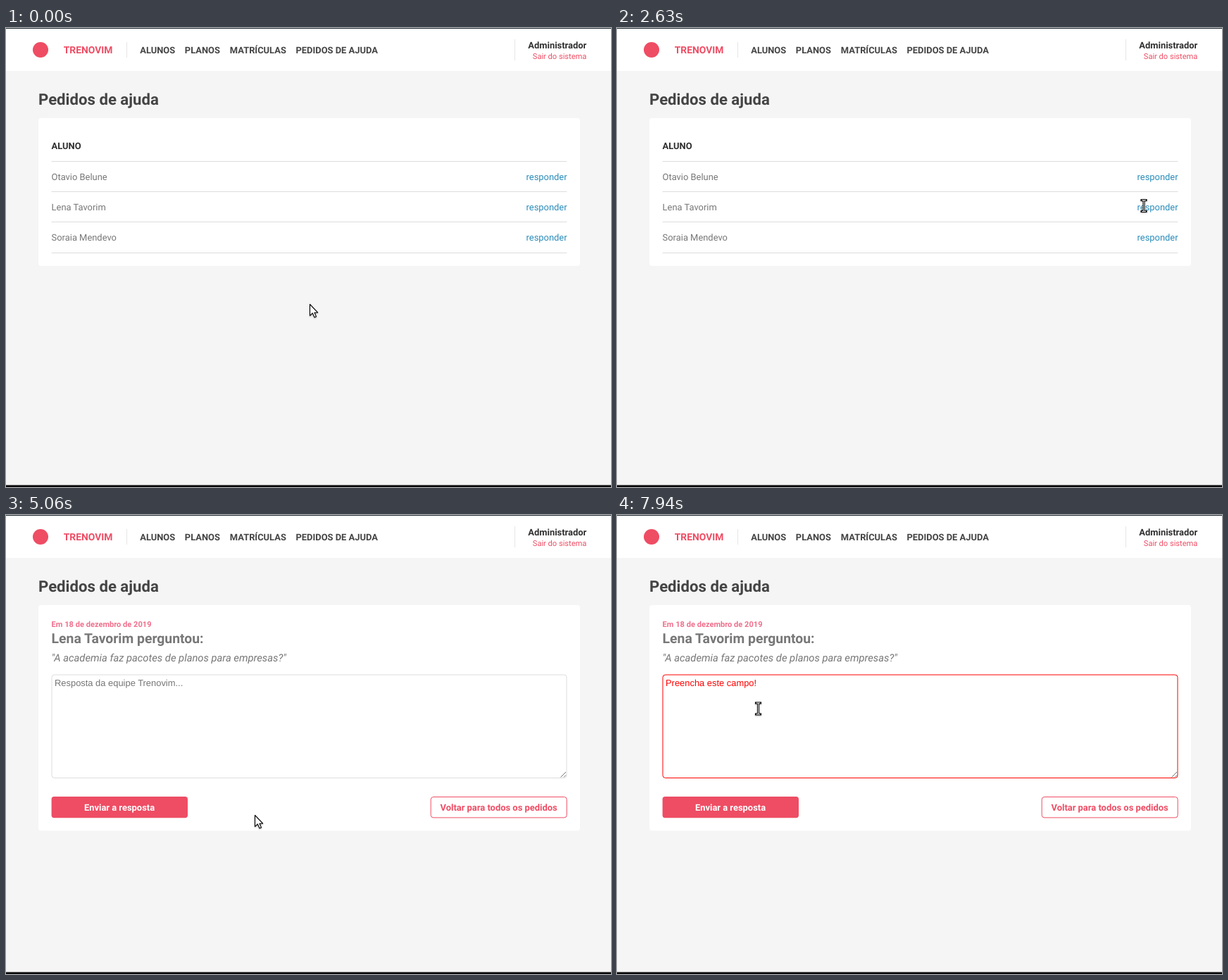
Animation of 859 by 652 pixels, one loop 8000 ms. Source, as an HTML page:

```html
<!DOCTYPE html>
<html lang="pt-BR">
<head>
<meta charset="utf-8">
<title>Pedidos de ajuda</title>
<style>
  html, body { margin: 0; width: 100%; height: 100%; overflow: hidden; background: #f5f5f5; }
  svg { display: block; width: 859px; height: 652px; }
  text { font: 12.92px Roboto, sans-serif; fill: #777; text-rendering: geometricPrecision; }
  .b { font-weight: 700; }
  .dark { fill: #444; }
  .darker { fill: #2f2f2f; }
  .pink { fill: #ee4d64; }
  .small { font-size: 11.08px; }
  .link { fill: #2a8cba; }
  .end { text-anchor: end; }
  .mid { text-anchor: middle; }
  .field { font-family: "Liberation Sans", Arial, sans-serif; fill: #757575; }
  .rule { stroke: #ddd; }
  .error .field { fill: #f00; }
  .error #box { stroke: #f00; }
  .hover #send { fill: #f0354f; }
  #cursor { filter: drop-shadow(.5px 1px .8px rgba(0, 0, 0, .3)); }
  #cursor path { stroke: #000; stroke-linejoin: round; fill: #fff; }
</style>
</head>
<body>
<svg viewBox="0 0 859 652">
  <rect width="859" height="652" fill="#f5f5f5"/>
  <rect width="859" height="61" fill="#fff"/>
  <rect width="859" height="1" fill="#1c2a30"/>
  <rect y="648" width="859" height="1.4" fill="#e6e6e6"/>
  <rect y="649.4" width="859" height="2.6" fill="#000"/>

  <circle cx="49" cy="31" r="11" class="pink"/>
  <text x="81.8" y="36" class="b pink" style="font-size:13.85px">TRENOVIM</text>
  <path d="M171.5 20V42M722.5 16V46" stroke="#e6e6e6"/>
  <g class="nav">
    <text x="190.2" y="35.6" class="b dark">ALUNOS</text>
    <text x="253.8" y="35.6" class="b dark">PLANOS</text>
    <text x="317.8" y="35.6" class="b dark">MATRÍCULAS</text>
    <text x="411.5" y="35.6" class="b dark">PEDIDOS DE AJUDA</text>
  </g>
  <text x="824.3" y="28.6" class="b darker end">Administrador</text>
  <text x="824.3" y="44" class="small pink end">Sair do sistema</text>
  <text x="46" y="109" class="b dark" style="font-size:22.15px">Pedidos de ajuda</text>

  <g id="list">
    <rect x="46" y="128" width="769" height="210" rx="3.7" fill="#fff"/>
    <text x="64.6" y="172" class="b darker">ALUNO</text>
    <path class="rule" d="M64.6 189.5H796.4"/>
  </g>

  <g id="reply">
    <rect x="46" y="128" width="769" height="320.5" rx="3.7" fill="#fff"/>
    <text x="64.6" y="158.5" class="b small" style="fill:#f0708c">Em 18 de dezembro de 2019</text>
    <text x="64.6" y="182.4" class="b" style="font-size:19.38px">Lena Tavorim perguntou:</text>
    <text x="64.6" y="208" style="font-size:14.77px;font-style:italic">"A academia faz pacotes de planos para empresas?"</text>
    <rect id="box" x="65" y="227" width="731" height="146.5" rx="3.7" fill="#fff" stroke="#ddd"/>
    <text id="hint" x="69" y="243" class="field"></text>
    <path d="M787.5 372.5L795 365M792 372.5L795 369.5" stroke="#666" stroke-width=".9"/>
    <rect id="send" x="64.6" y="400" width="193.4" height="30.3" rx="3.7" class="pink"/>
    <text x="161" y="419.7" class="b mid" style="fill:#fff">Enviar a resposta</text>
    <rect x="603.2" y="400.5" width="193" height="29.4" rx="3.7" fill="#fff" stroke="#ee4d64"/>
    <text x="699.6" y="419.7" class="b pink mid">Voltar para todos os pedidos</text>
  </g>

  <g id="cursor">
    <g id="arrow"><path stroke-width="1.1" d="M.5 .5V16.6L4.3 13L7 19L9.5 18L7 12.2H11.6Z"/></g>
    <g id="beam">
      <path d="M-3-8H3M0-8V8M-3 8H3" stroke-width="3" stroke-linecap="square"/>
      <path d="M-3-8H3M0-8V8M-3 8H3" style="stroke:#fff" stroke-width="1"/>
    </g>
    <g id="hand">
      <path stroke-width="1.2" d="M-1.3 8.5V1.8Q-1.3 .5 0 .5Q1.3 .5 1.3 1.8V5.5Q2.5 4.8 3.8 6Q5 5.4 6.2 6.7Q8.5 6.3 8.5 8.5V11Q8.5 13 7.2 14.5V16.5H-1V15Q-4 11.8-5.4 9.6Q-5.6 7.4-3.5 7.8Z"/>
      <path stroke-width=".9" d="M1.3 5.5V9M3.8 6V9M6.2 6.7V9"/>
    </g>
  </g>
</svg>
<script>
const LOOP = 8000, TICK = 62.5;
const $ = id => document.getElementById(id);
const list = $('list'), reply = $('reply'), hint = $('hint'), cursor = $('cursor');
const shapes = ['arrow', 'beam', 'hand'];

['Otavio Belune', 'Lena Tavorim', 'Soraia Mendevo'].forEach((name, i) => {
  const y = 215.6 + i * 43.25, line = Math.round(232 + i * 43.3) + .5;
  list.insertAdjacentHTML('beforeend',
    `<text x="64.6" y="${y}">${name}</text>
     <text x="796.6" y="${y}" class="link end">responder</text>
     <path class="rule" d="M64.6 ${line}H796.4"/>`);
});

// Moves: start tick, end tick, ticks per step, x, y, shape on arrival
const moves = [
  [0, 0, 1, 431, 392, 'arrow'],
  [10, 15, 1, 502, 360, 'arrow'],
  [15, 23, 1, 661, 286, 'arrow'],
  [23, 24, 1, 679, 282, 'arrow'],
  [29, 31, 1, 752, 251, 'hand'],
  [41, 42, 1, 748, 252.5, 'beam'],
  [46, 47, 1, 738, 252.5, 'beam'],
  [47, 48, 1, 716, 253, 'beam'],
  [48, 50, 2, 685, 255, 'beam'],
  [50, 58, 2, 549, 368, 'beam'],
  [58, 60, 2, 508, 386, 'arrow'],
  [60, 64, 2, 414, 420, 'arrow'],
  [64, 68, 2, 349, 428, 'arrow'],
  [77, 83, 2, 355, 425, 'arrow'],
  [87, 88, 1, 336, 420, 'arrow'],
  [92, 93, 1, 312, 418, 'arrow'],
  [93, 95, 2, 272, 414, 'arrow'],
  [95, 96, 1, 246, 412, 'hand'],
  [117, 118, 1, 253, 413.5, 'hand'],
  [120, 121, 1, 248, 404, 'hand'],
  [121, 123, 2, 232, 352, 'beam'],
  [123, 127, 2, 200.5, 275, 'beam']
];

function pointer(tick) {
  let x, y, shape;
  for (const [from, to, step, px, py, kind] of moves) {
    if (tick < from) break;
    if (tick < to) {
      const k = Math.floor((tick - from) / step) * step / (to - from);
      return { x: x + (px - x) * k, y: y + (py - y) * k, shape };
    }
    [x, y, shape] = [px, py, kind];
  }
  return { x, y, shape };
}

function draw(now) {
  const tick = Math.floor((now % LOOP + 4) / TICK) % (LOOP / TICK);
  const p = pointer(tick), open = tick >= 43, error = tick >= 109;
  list.style.display = open ? 'none' : '';
  reply.style.display = open ? '' : 'none';
  reply.classList.toggle('error', error);
  reply.classList.toggle('hover', p.shape === 'hand');
  hint.textContent = error ? 'Preencha este campo!' : 'Resposta da equipe Trenovim...';
  cursor.setAttribute('transform', `translate(${p.x} ${p.y})`);
  for (const id of shapes) $(id).style.display = id === p.shape ? '' : 'none';
}

const start = performance.now();
function loop() {
  draw(performance.now() - start);
  requestAnimationFrame(loop);
}
loop();
</script>
</body>
</html>
```
